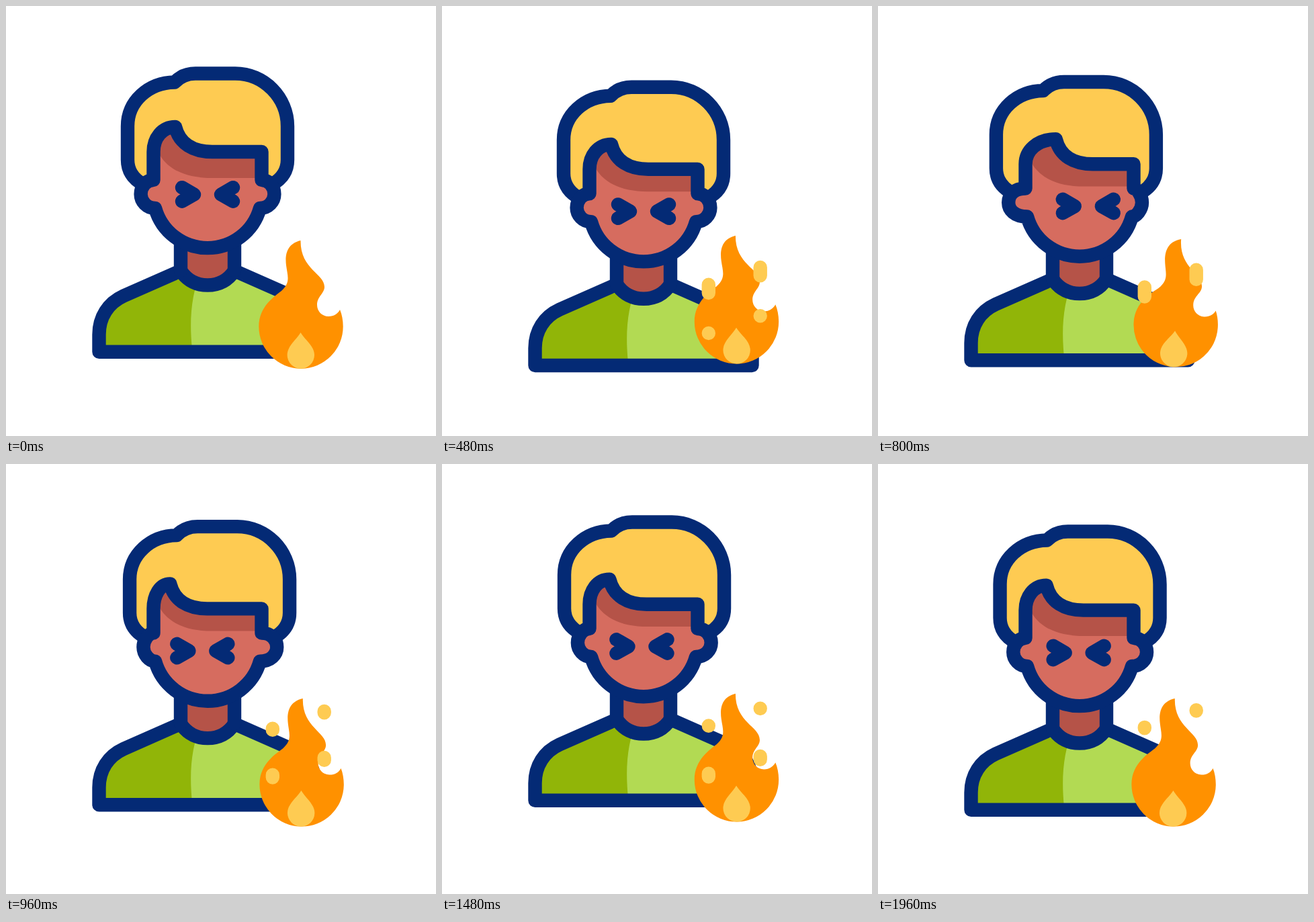
Animation of 640 by 640 pixels, one loop 2 s. Source, as an HTML page:

```html
<!DOCTYPE html>
<html lang="en">
<head>
<meta charset="utf-8">
<title>Man and flame</title>
<style>
  html, body { margin: 0; width: 100%; height: 100%; overflow: hidden; background: #fff; }
  svg { display: block; width: 100%; height: 100%; }
  .line { fill: none; stroke: #042a75; stroke-width: 20.4; stroke-linecap: round; stroke-linejoin: round; }
  .gold { fill: #fecb52; }
  .spark { fill: none; stroke: #fecb52; stroke-width: 20.4; stroke-linecap: round; }
  .skin { fill: #d66c5f; }
  .shade { fill: #b55348; }
</style>
</head>
<body>
<svg viewBox="0 0 640 640">
  <defs>
    <path id="torso" d="M138.5 514.7V489C138.5 463 152 442 175 431.5L260 394C270 409 284 415.5 300 415.5S330 409 340 394L425 431.5C448 442 461.5 463 461.5 489V514.7Z"/>
    <clipPath id="torsoClip"><use href="#torso"/></clipPath>
  </defs>
  <g id="man">
    <path class="shade" d="M260 340V394C270 409 284 415.5 300 415.5S330 409 340 394V340Z"/>
    <use href="#torso" fill="#b2da53"/>
    <path clip-path="url(#torsoClip)" fill="#91b508" d="M120 390H292C275 430 272 468 278 520H120Z"/>
    <use href="#torso" class="line"/>
    <path class="line" d="M260 345V394M340 345V394"/>
    <path id="hair" class="line gold" style="fill:#fecb52" d="M205 266C190 258 181 246 181 229V179C181 142 212 114 251 113.5C259 105 268 100.5 282 100.5H341C384 100.5 419 136 419 179V229C419 246 410 258 395 266"/>
    <path id="face" class="skin"/>
    <path id="shadow" class="shade"/>
    <path id="outline" class="line"/>
    <path id="eyes" class="line" style="fill:#042a75" d="M262 270.2L280 280.5L262 290.7M338 270.2L320 280.5L338 290.7"/>
  </g>
  <g id="flame">
    <path fill="#ff9100" d="M438.5 349C418 354 415 370 417 386C419 402 424 411 410 424C400 432 376.3 447 376.3 477A62.7 62.7 0 0 0 501.7 477C501.7 468 500 459 497 452C494 458 488 462 480 462C470 462 463 454 463 445C463 432 474 428 474 418C474 398 438 392 438.5 349Z"/>
    <path class="gold" d="M438.5 486C445 497 459 506 459 519.5A20.2 20.2 0 0 1 418.6 519.5C418.6 506 432 497 438.5 486Z"/>
  </g>
  <path id="sparks" class="spark"/>
</svg>
<script>
const LOOP = 2000, STEP = 40, SHAKE = 12.8;
const $ = id => document.getElementById(id);
const smooth = p => p * p * (3 - 2 * p);
const linear = p => p;
const clamp = p => Math.min(1, Math.max(0, p));

// keys: [time, value, easing into this key]
function track(t, keys) {
  if (t <= keys[0][0]) return keys[0][1];
  for (let i = 1; i < keys.length; i++) {
    const [t0, v0] = keys[i - 1], [t1, v1, ease = smooth] = keys[i];
    if (t <= t1) return v0 + (v1 - v0) * ease((t - t0) / (t1 - t0));
  }
  return keys[keys.length - 1][1];
}

const bob = [[200, 0], [600, 25.8], [1200, -25.4], [1800, 0]];
const nod = [[200, 0], [500, 5], [1800, 5], [2000, 0]];
const shake = [[600, 0]];
for (let i = 0; i < 6; i++) shake.push([800 + i * 200, i % 2 ? -SHAKE : SHAKE, linear]);
shake.push([2000, 0]);

const rises = [[30, 697], [480, 990], [805, 1484], [1317, 1984]];
const columns = [[396.8, 487], [473.7, 461.3]];

function sparkPath(t) {
  let d = "";
  for (const [start, end] of rises) {
    if (t < start || t > end) continue;
    const p = (t - start) / (end - start);
    const half = 7.6 * Math.min(clamp((p - 0.15) / 0.3), clamp((1 - p) / 0.4));
    for (const [x, base] of columns) {
      const y = base - 98 * p;
      d += `M${x} ${y + half}V${y - half - 0.01}`;
    }
  }
  return d;
}

function drawHead(dx, dy) {
  const ear = -dx / 2, fringe = 217 + dy * 1.15;
  const px = 252 + dx, py = 180 + dy * 1.15;
  const top = `M219.5 259V${fringe}C219.5 ${fringe - 20} ${232 + dx * 0.4} ${py} ${px} ${py}` +
    `C${px + 6} ${py + 25} ${px + 27} ${fringe} ${px + 55} ${fringe}H380.5`;
  const l = 200.6 + ear, r = 399.4 + ear;
  const head = `${top}V259C${r - 8} 259 ${r} 269 ${r} 280S${r - 9} 301 378 301` +
    `A81 81 0 0 1 222 301C${l + 9} 301 ${l} 291 ${l} 280S${l + 8} 259 219.5 259Z`;
  $("face").setAttribute("d", head);
  $("outline").setAttribute("d", head);
  $("shadow").setAttribute("d", `${top}V256H306C270 256 243 245 229 222L219.5 215Z`);
  $("hair").setAttribute("transform", `translate(${-dx * 0.4} 0)`);
  $("eyes").setAttribute("transform", `translate(${dx} ${dy})`);
}

function draw(t) {
  const turn = t / 1000 * 2 * Math.PI;
  $("man").setAttribute("transform", `translate(0 ${track(t, bob)})`);
  drawHead(track(t, shake), track(t, nod));
  const lift = -3.6 * (1 - Math.cos(turn));
  $("flame").setAttribute("transform", `translate(0 ${lift}) rotate(${-4 * Math.sin(turn)} 439 540)`);
  $("sparks").setAttribute("d", sparkPath(t));
}

const begin = performance.now();
function tick() {
  const t = (performance.now() - begin) % LOOP;
  draw(Math.floor(t / STEP) * STEP);
  requestAnimationFrame(tick);
}
tick();
</script>
</body>
</html>
```
